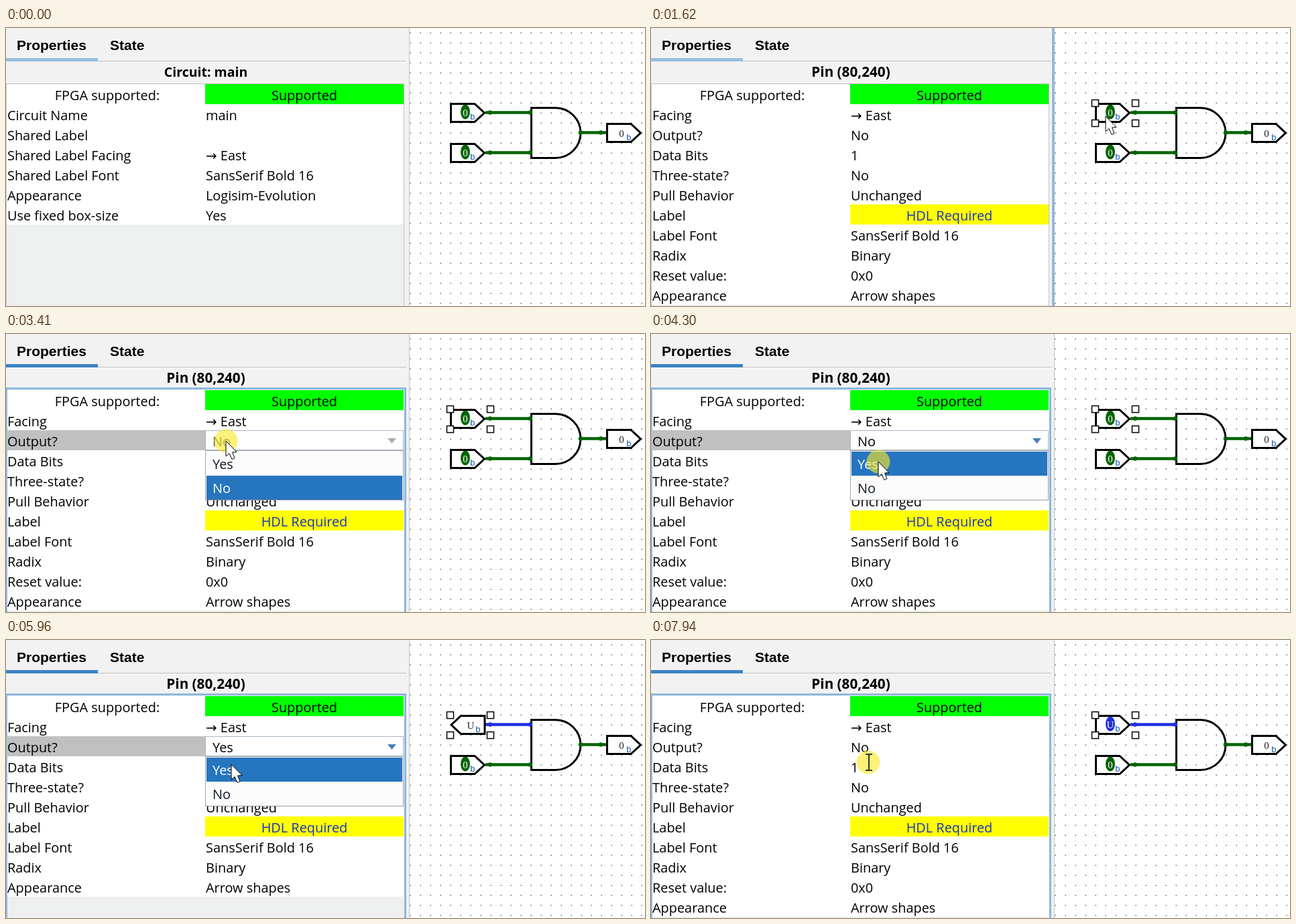
An HTML page with a canvas that plays this animation: 953x416 px, repeating every 8 s.

```html
<!DOCTYPE html>
<html lang="en">
<head>
<meta charset="utf-8">
<title>Pin properties</title>
<style>
html, body { margin: 0; width: 100%; height: 100%; overflow: hidden; background: #fff; }
canvas { display: block; }
</style>
</head>
<body>
<canvas id="stage" width="953" height="416"></canvas>
<script>
const ctx = document.getElementById('stage').getContext('2d');
const LOOP = 8000, STEP = 70;
const UI = '"Open Sans", "DejaVu Sans", sans-serif';
const ROW_TOP = 84, ROW = 30, VALUE_X = 297;
const GREEN = '#006400', BLUE = '#1f30e0', SELECT = '#2675bf';
const PIN = [[0, 0], [35.5, 0], [50, 13.5], [35.5, 27], [0, 27]];
const PIN_REVERSED = PIN.map(([x, y]) => [50.5 - x, y]);

// Pointer moves: start time, number of steps, target x, target y
const START = [728, -28];
const MOVES = [
  [70, 9, 684, 124], [1620, 1, 678, 132], [1690, 10, 328, 160], [3880, 4, 339, 191],
  [5020, 7, 338, 164], [5770, 7, 333, 220], [7570, 5, 324, 183]
];
const CLICKS = [[690, 760], [3410, 3480], [4300, 4430], [5440, 5500], [6240, 6380], [7940, 8000]];

const CIRCUIT_ROWS = [
  ['Circuit Name', 'main'], ['Shared Label', ''], ['Shared Label Facing', '→ East'],
  ['Shared Label Font', 'SansSerif Bold 16'], ['Appearance', 'Logisim-Evolution'],
  ['Use fixed box-size', 'Yes']
];
const pinRows = output => [
  ['Facing', '→ East'], ['Output?', output ? 'Yes' : 'No'], ['Data Bits', '1'],
  ['Three-state?', 'No'], ['Pull Behavior', 'Unchanged'], ['Label', 'HDL Required'],
  ['Label Font', 'SansSerif Bold 16'], ['Radix', 'Binary'],
  ...(output ? [] : [['Reset value:', '0x0']]), ['Appearance', 'Arrow shapes']
];

const within = (t, [from, to]) => t >= from && t < to;

function rect(x, y, w, h, color) {
  ctx.fillStyle = color;
  ctx.fillRect(x, y, w, h);
}

function frame(x, y, w, h, width, color) {
  ctx.lineWidth = width;
  ctx.strokeStyle = color;
  ctx.strokeRect(x, y, w, h);
}

function text(str, x, y, { color = '#000', font = `19.9px ${UI}`, align = 'left' } = {}) {
  ctx.fillStyle = color;
  ctx.font = font;
  ctx.textAlign = align;
  ctx.fillText(str, x, y);
}

function line(points, width, color) {
  ctx.beginPath();
  points.forEach(([x, y]) => ctx.lineTo(x, y));
  ctx.lineWidth = width;
  ctx.strokeStyle = color;
  ctx.stroke();
}

function polygon(points, x, y, fill, width) {
  ctx.beginPath();
  points.forEach(([dx, dy]) => ctx.lineTo(x + dx, y + dy));
  ctx.closePath();
  ctx.fillStyle = fill;
  ctx.fill();
  if (width) {
    ctx.lineWidth = width;
    ctx.strokeStyle = '#000';
    ctx.stroke();
  }
}

function oval(x, y, rx, ry, color) {
  ctx.beginPath();
  ctx.ellipse(x, y, rx, ry, 0, 0, Math.PI * 2);
  ctx.fillStyle = color;
  ctx.fill();
}

function pointerAt(t) {
  let [x, y] = START;
  for (const [start, steps, toX, toY] of MOVES) {
    if (t < start) break;
    const u = Math.min(1, (Math.floor((t - start) / STEP) + 1) / steps);
    const p = u * u * (3 - 2 * u);
    x += (toX - x) * p;
    y += (toY - y) * p;
  }
  return [x, y];
}

function drawTabs(focused) {
  rect(0, 0, 602, 416, '#f2f2f2');
  const font = 'bold 21px "Liberation Sans", Arial, sans-serif';
  text('Properties', 16, 33, { font });
  text('State', 155, 33, { font });
  rect(137, 49, 460, 1, '#c2c2c2');
  rect(0, 45, 137, 5, focused ? '#3b83c4' : '#98bede');
}

function drawTable(rows, focused) {
  const height = (rows.length + 1) * ROW;
  rect(0, 83, 594, 333, '#eef0f0');
  rect(1, ROW_TOP, 592, height, '#fff');
  if (focused) {
    frame(0.5, 81.5, 595, 350, 3, '#8cb8e2');
  } else {
    frame(0.5, 83.5, 593, 350, 1, '#c2c2c2');
  }
  rect(VALUE_X, ROW_TOP, 296, ROW, '#00ff00');
  text('FPGA supported:', 151, 108, { align: 'center' });
  text('Supported', 445, 108, { align: 'center' });
  rows.forEach(([name, value], i) => {
    const top = ROW_TOP + (i + 1) * ROW;
    text(name, 2, top + 24);
    if (name === 'Label') {
      rect(VALUE_X, top, 296, ROW, '#ffff00');
      text(value, 445, top + 24, { color: '#1a33c0', align: 'center' });
    } else {
      text(value, 298, top + 24);
    }
  });
}

function drawDropdown(output, pointerY) {
  const hovering = pointerY < 174;
  const active = hovering ? (output ? 0 : 1) : (pointerY < 212 ? 0 : 1);
  rect(1, 144, 296, ROW, '#c0c0c0');
  text('Output?', 2, 168);
  rect(VALUE_X, 144, 296, ROW, '#fff');
  frame(297.5, 144.5, 295, 29, 1, '#a9b9c9');
  text(output ? 'Yes' : 'No', 308, 168, { color: hovering ? '#444' : '#000' });
  polygon([[0, 0], [13, 0], [6.5, 8]], 569, 156, hovering ? '#adadad' : '#4a7fb5');
  rect(VALUE_X, 174, 296, 75, '#fcfcfc');
  frame(297.5, 174.5, 295, 74, 1, '#a0a0a0');
  rect(299, 176 + 36 * active, 292, 36, SELECT);
  ['Yes', 'No'].forEach((label, i) =>
    text(label, 308, 202 + 36 * i, { color: i === active ? '#fff' : '#101828' }));
}

function drawValue(value, x, y, fill) {
  if (fill) oval(x, y - 1.5, 7, 11, fill);
  text(value, x, y + 5, {
    color: fill ? '#fff' : '#222', align: 'center', font: '15px "Liberation Serif", serif'
  });
  text('b', x + 11, y + 10, {
    color: '#0b55b0', align: 'center', font: '13px "Liberation Mono", monospace'
  });
}

function drawWire(x1, x2, y, color, joints) {
  line([[x1, y], [x2, y]], 4.5, color);
  joints.forEach(x => oval(x, y, 3.2, 3.2, color));
}

function drawCircuit(selected, output, floating) {
  rect(602, 0, 351, 416, '#fff');
  for (let x = 602.5; x < 953; x += 15)
    for (let y = 6.5; y < 416; y += 15) rect(x, y, 1.5, 1.5, '#666');

  ctx.beginPath();
  ctx.arc(819.5, 157, 37.5, -Math.PI / 2, Math.PI / 2);
  ctx.lineTo(783.5, 194.5);
  ctx.lineTo(783.5, 119.5);
  ctx.closePath();
  ctx.lineWidth = 3;
  ctx.strokeStyle = '#000';
  ctx.stroke();

  const wireColor = floating ? BLUE : GREEN;
  drawWire(715, 784, 126.5, wireColor, [722, 782]);
  drawWire(715, 784, 186.5, GREEN, [722, 782]);
  drawWire(857, 896, 156.5, GREEN, [857, 887]);

  polygon(output ? PIN_REVERSED : PIN, 663.5, 113.5, '#fff', 3);
  if (output) drawValue('U', 693, 128);
  else drawValue(floating ? 'U' : '0', 685, 127, wireColor);
  polygon(PIN, 663.5, 173.5, '#fff', 3);
  drawValue('0', 685, 187, GREEN);
  polygon(PIN, 896.5, 143.5, '#fff', 3);
  drawValue('0', 918, 157.5);

  if (!selected) return;
  for (const x of [662.5, 722.5]) {
    for (const y of [112.5, 142.5]) {
      rect(x - 5, y - 5, 10, 10, '#fff');
      frame(x - 5, y - 5, 10, 10, 1.5, '#000');
    }
  }
}

function drawPointer(t, x, y) {
  if (CLICKS.some(c => within(t, c))) oval(x, y, 17.5, 17.5, 'rgba(250,232,40,.62)');
  if (t >= 7940) {
    line([[x - 4, y - 12], [x + 6, y - 12]], 2, '#333');
    line([[x + 1, y - 12], [x + 1, y + 12]], 2, '#333');
    line([[x - 4, y + 12], [x + 6, y + 12]], 2, '#333');
  } else {
    polygon([[0, 0], [0, 23], [5, 18.5], [9, 27.5], [13, 25.5], [9.5, 17], [16, 16.5]], x, y, '#fff', 1);
  }
}

function draw(now) {
  const t = now % LOOP;
  const selected = t >= 690, focused = t >= 3410;
  const output = within(t, [4430, 6380]);
  const open = within(t, [3410, 4430]) || within(t, [5440, 6380]);
  const [x, y] = pointerAt(t);

  drawTabs(focused);
  text(selected ? 'Pin (80,240)' : 'Circuit: main', 298, 73, {
    font: `bold ${selected ? 20.7 : 19.5}px ${UI}`, align: 'center'
  });
  drawTable(selected ? pinRows(output) : CIRCUIT_ROWS, focused);
  if (open) drawDropdown(output, y);
  drawCircuit(selected, output, t >= 4430);
  if (selected && !focused) rect(598, 0, 4, 416, '#94b8dc');
  else rect(601, 0, 1, 416, '#c2c2c2');
  if (t >= 70) drawPointer(t, x, y);
  requestAnimationFrame(draw);
}
requestAnimationFrame(draw);
</script>
</body>
</html>
```
